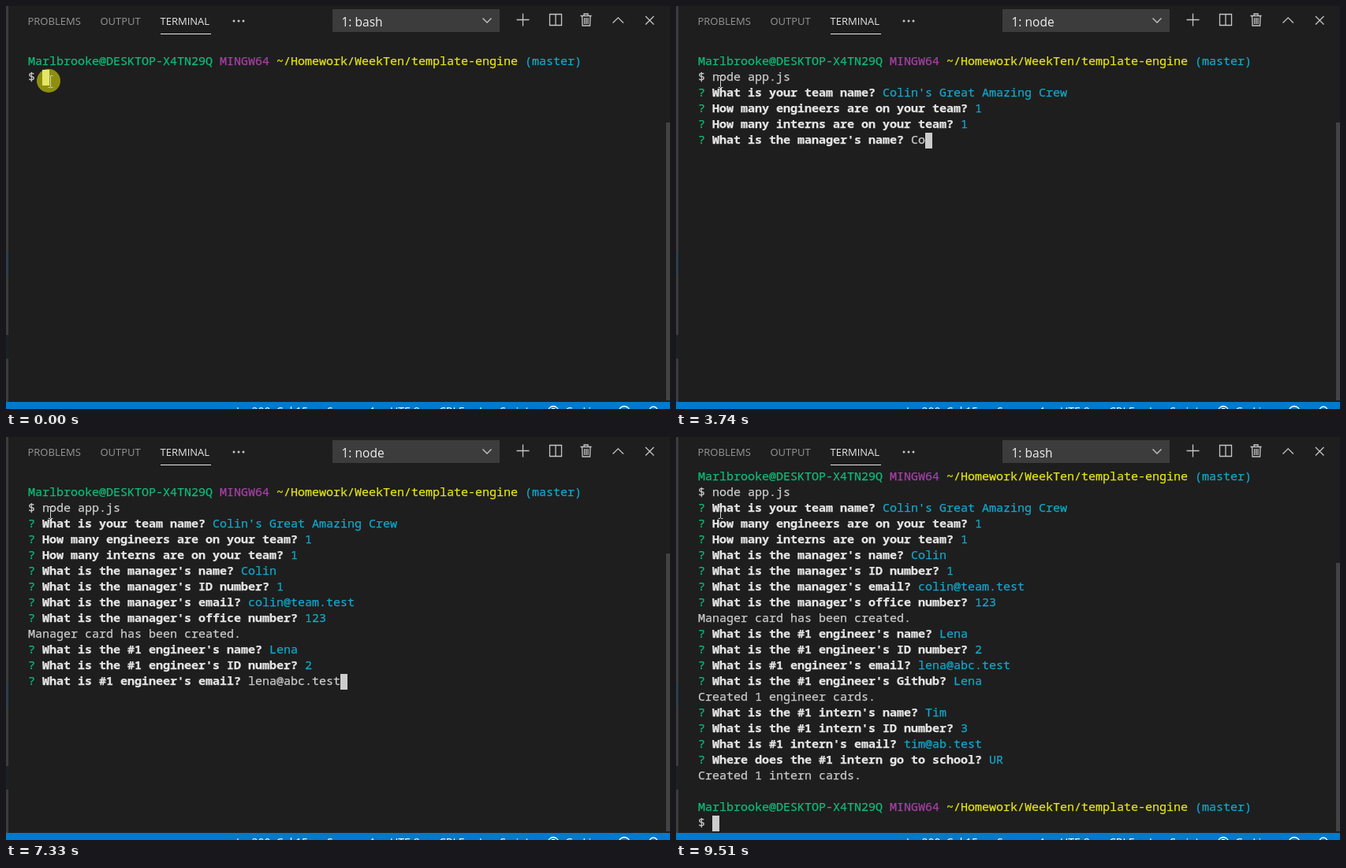
An HTML page that plays this animation: 842 px wide and 512 px high, repeating every 9.57 s.

```html
<!DOCTYPE html>
<html lang="en">
<head>
<meta charset="utf-8">
<title>Terminal session</title>
<style>
  html, body { margin: 0; width: 100%; height: 100%; overflow: hidden; background: #1e1e1e; }
  svg { display: block; }
  text { font-family: "Open Sans", sans-serif; white-space: pre; }
  #rows text { font: 15px "Noto Sans Mono", monospace; color: #ccc; }
  #rows tspan { fill: currentColor; stroke: currentColor; stroke-width: .25; }
  .tabs { font-size: 13px; fill: #969696; }
  .icons { fill: none; stroke: #c5c5c5; stroke-width: 1.3; }
  .status { font-size: 14px; fill: #fff; }
  .bold { font-weight: 700; color: #e5e5e5; }
  .green { color: #0dbc79; }
  .purple { color: #a640a6; }
  .yellow { color: #e5e510; }
  .cyan { color: #11a8cd; }
</style>
</head>
<body>
<svg width="842" height="512" viewBox="0 0 842 512">
  <rect width="842" height="512" fill="#1e1e1e"/>
  <g id="edge">
    <rect width="3" height="503" fill="#3c3c3c"/>
    <rect y="313" width="3" height="29" fill="#2b3f4e"/>
    <rect y="418" width="3" height="30" fill="#1b2127"/>
  </g>

  <g class="tabs">
    <text x="27.5" y="24">PROBLEMS</text>
    <text x="119.5" y="24">OUTPUT</text>
    <text x="195.5" y="24" fill="#e7e7e7">TERMINAL</text>
  </g>
  <rect x="196" y="35" width="64" height="1" fill="#e7e7e7"/>
  <g fill="#c5c5c5">
    <circle cx="289" cy="19" r="1.5"/><circle cx="295" cy="19" r="1.5"/><circle cx="301" cy="19" r="1.5"/>
  </g>

  <rect x="414" y="4" width="212" height="29" fill="#3c3c3c"/>
  <text id="shell" x="425.5" y="25.5" font-size="15.5" fill="#f0f0f0"></text>
  <g class="icons">
    <path d="M604.5 15.5l5.5 5.5 5.5-5.5"/>
    <path d="M647.5 17.5h16M655.5 9.5v16"/>
    <path d="M689.5 10.5h15v14h-15zM697 10.5v14"/>
    <path d="M728.5 12.5h14M733 12.5v-2.5h5v2.5M730.5 12.5l.5 12.5h9.5l.5-12.5M733.5 15v8M735.7 15v8M738 15v8"/>
    <path d="M769.5 21.5l6.7-6.7 6.7 6.7"/>
    <path d="M811 13l10.5 10.5M821.5 13L811 23.5"/>
  </g>

  <g id="rows"></g>
  <rect id="caret" width="9" height="20" fill="#ccc"/>
  <circle id="click" cx="54" cy="95" r="15" fill="#ff0" opacity=".5"/>
  <path d="M53.5 88.5h2.5m1 0h2.5M56.5 89v14M53.5 103.5h2.5m1 0h2.5" fill="none" stroke="#d0d0d0"/>
  <rect id="scrollbar" x="837" width="5" fill="#434343"/>

  <rect y="503" width="842" height="9" fill="#007acc"/>
  <g class="status">
    <text x="292" y="520">Ln 200, Col 15</text>
    <text x="407" y="520">Spaces: 4</text>
    <text x="487" y="520">UTF-8</text>
    <text x="549" y="520">CRLF</text>
    <text x="600" y="520">JavaScript</text>
    <text x="709" y="520">Go Live</text>
  </g>
  <g fill="none" stroke="#fff" stroke-width="1.3">
    <circle cx="694" cy="515" r="6.5"/><circle cx="694" cy="515" r="3.5"/>
    <circle cx="784" cy="515.5" r="7"/>
    <path d="M816 516v-2a5 5 0 0 1 10 0v2"/>
  </g>
</svg>
<script>
const LOOP = 9570, LEFT = 28, TOP = 61, ROW = 20, CHAR = 9, BASELINE = 13.5;
const COMMAND = 'node app.js';

// Bursts of key presses: first time, last time, number of presses.
const BURSTS = [
  [80, 960, 12], [1040, 1980, 13], [2090, 3020, 12], [3100, 4040, 13], [4120, 5040, 13],
  [5120, 6020, 13], [6090, 7030, 13], [7120, 8030, 13], [8120, 9040, 13], [9120, 9510, 6]
];
const pressTimes = BURSTS.flatMap(([from, to, count]) =>
  Array.from({ length: count }, (_, i) => Math.floor((from + (to - from) * i / (count - 1)) / 10) * 10));

// Question, answer, line printed after the answer.
const DIALOG = [
  ['What is your team name?', "Colin's Great Amazing Crew"],
  ['How many engineers are on your team?', '1'],
  ['How many interns are on your team?', '1'],
  ["What is the manager's name?", 'Colin'],
  ["What is the manager's ID number?", '1'],
  ["What is the manager's email?", 'colin@team.test'],
  ["What is the manager's office number?", '123', 'Manager card has been created.'],
  ["What is the #1 engineer's name?", 'Lena'],
  ["What is the #1 engineer's ID number?", '2'],
  ["What is #1 engineer's email?", 'lena@abc.test'],
  ["What is the #1 engineer's Github?", 'Lena', 'Created 1 engineer cards.'],
  ["What is the #1 intern's name?", 'Tim'],
  ["What is the #1 intern's ID number?", '3'],
  ["What is #1 intern's email?", 'tim@ab.test'],
  ['Where does the #1 intern go to school?', 'UR', 'Created 1 intern cards.']
];

// A row is a list of [text, class] pieces.
const plain = text => [[text, '']];
const PROMPT = [
  ['Marlbrooke@DESKTOP-X4TN29Q ', 'green'], ['MINGW64 ', 'purple'],
  ['~/Homework/WeekTen/template-engine ', 'yellow'], ['(master)', 'cyan']
];
const ask = (question, answer, color) =>
  [['? ', 'green'], [question + ' ', 'bold'], [answer, color]];

function buildRows(presses) {
  const rows = [PROMPT, plain('$ ' + COMMAND.slice(0, presses))];
  let left = presses - COMMAND.length - 1;
  if (left < 0) return rows;
  if (left === 0) return [...rows, plain('')];
  left--;
  for (const [question, answer, note] of DIALOG) {
    if (left <= answer.length) return [...rows, ask(question, answer.slice(0, left), '')];
    rows.push(ask(question, answer, 'cyan'));
    if (note) rows.push(plain(note));
    left -= answer.length + 1;
  }
  rows.push(plain(''));
  if (left > 0) rows.push(PROMPT, plain('$ '));
  return rows;
}

const byId = id => document.getElementById(id);
const setAttributes = (id, values) => {
  for (const name in values) byId(id).setAttribute(name, values[name]);
};

function draw(presses) {
  const rows = buildRows(presses);
  const scrolled = rows.length > 22;
  const top = scrolled ? TOP - ROW : TOP;
  byId('rows').innerHTML = rows.map((row, i) =>
    `<text x="${LEFT}" y="${top + i * ROW + BASELINE}">` +
    row.map(([text, color]) => `<tspan class="${color}">${text}</tspan>`).join('') +
    '</text>').join('');

  const columns = rows.at(-1).reduce((sum, [text]) => sum + text.length, 0);
  setAttributes('caret', { x: LEFT + columns * CHAR, y: top + (rows.length - 1) * ROW });
  const barTop = scrolled ? 160 : 148;
  setAttributes('scrollbar', { y: barTop, height: 501 - barTop });
  setAttributes('click', { visibility: presses ? 'hidden' : 'visible' });

  const running = presses > COMMAND.length && presses < pressTimes.length;
  byId('shell').textContent = running ? '1: node' : '1: bash';
}

let shown = -1;
function tick() {
  const time = performance.now() % LOOP;
  const presses = pressTimes.filter(at => at <= time).length;
  if (presses !== shown) draw(shown = presses);
  requestAnimationFrame(tick);
}
tick();
</script>
</body>
</html>
```
